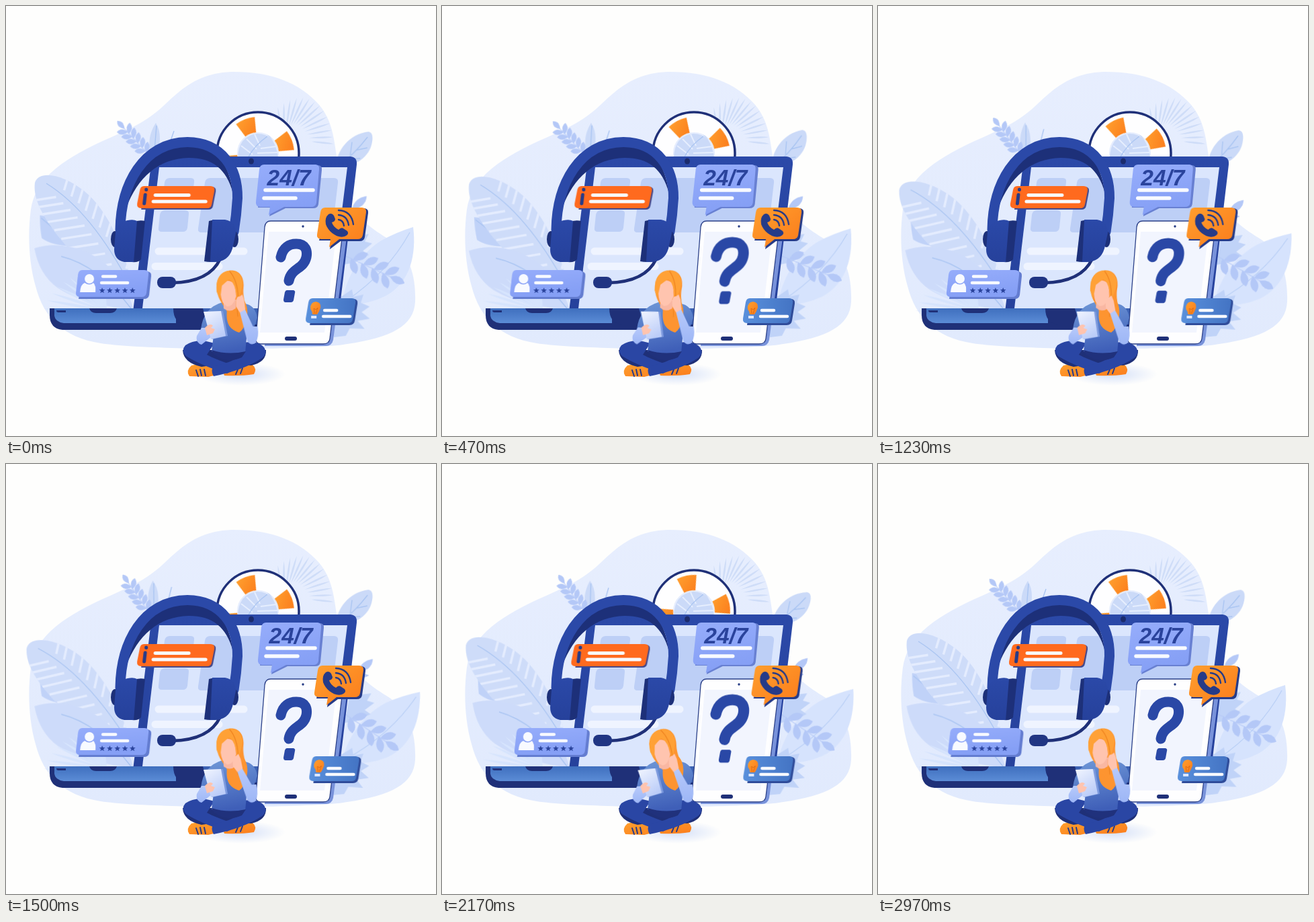
An HTML page that plays this animation: 640x640 px, repeating every 3010 ms.

```html
<!DOCTYPE html>
<html lang="en">
<head>
<meta charset="utf-8">
<title>Customer support</title>
<style>
html, body { margin: 0; width: 100%; height: 100%; overflow: hidden; background: #fefefd; }
svg { display: block; width: 100vw; height: 100vh; }
.even, .skew {
  transform-origin: var(--o, 0 0);
  animation: even 3010ms cubic-bezier(.37, 0, .63, 1) var(--d, 0ms) infinite;
}
.skew { animation-name: skew; animation-delay: var(--d, -2160ms); }
.pulse { transform-origin: 428px 394px; animation: pulse 1505ms cubic-bezier(.37, 0, .63, 1) infinite; }
@keyframes even { 0%, 100% { transform: var(--a); } 50% { transform: var(--b); } }
@keyframes skew { 0%, 100% { transform: var(--a); } 43% { transform: var(--b); } }
@keyframes pulse { 50% { transform: scale(1.08); } }
.bars { stroke: #f8faff; stroke-width: 5.5; stroke-linecap: round; fill: none; }
.vein { stroke: #aac5f2; stroke-width: 1.4; fill: none; }
.sprig { fill: #b4c8f7; stroke: #b4c8f7; }
.line { fill: none; stroke-linecap: round; stroke-linejoin: round; }
</style>
</head>
<body>
<svg viewBox="0 0 640 640">
<defs>
  <linearGradient id="blob" x2="0" y2="1"><stop stop-color="#e7eefe"/><stop offset="1" stop-color="#e1eafd"/></linearGradient>
  <linearGradient id="orange" x2="1" y2="1"><stop stop-color="#ff9f2e"/><stop offset="1" stop-color="#fb7c1c"/></linearGradient>
  <linearGradient id="sky" x2=".3" y2="1"><stop stop-color="#96adfb"/><stop offset="1" stop-color="#859ff5"/></linearGradient>
  <linearGradient id="slate" x2="1"><stop stop-color="#5990dc"/><stop offset="1" stop-color="#4474c4"/></linearGradient>
  <linearGradient id="base" x2="0" y2="1"><stop stop-color="#3f6fbe"/><stop offset="1" stop-color="#5b8cd6"/></linearGradient>
  <linearGradient id="navy" x2="0" y2="1"><stop stop-color="#2b49a8"/><stop offset="1" stop-color="#26419b"/></linearGradient>
  <linearGradient id="shirt" x2=".2" y2="1"><stop stop-color="#7099d8"/><stop offset="1" stop-color="#3f5fb8"/></linearGradient>
  <linearGradient id="sleeve" x2="0" y2="1"><stop stop-color="#b7cafb"/><stop offset="1" stop-color="#9db6f6"/></linearGradient>
  <linearGradient id="pad" x2=".5" y2="1"><stop stop-color="#f1f5ff"/><stop offset="1" stop-color="#bccdf8"/></linearGradient>
  <radialGradient id="shade"><stop stop-color="#d5e0f8"/><stop offset="1" stop-color="#fefefd"/></radialGradient>
  <clipPath id="bigShape"><path d="M43 263C49 243 86 251 116 275C153 305 179 365 190 430C145 413 105 377 77 342C54 312 40 287 43 263Z"/></clipPath>
  <clipPath id="aboveLid"><path d="M300 140H450V226H300Z"/></clipPath>
</defs>

<path fill="url(#blob)" d="M335 98C392 97 436 113 466 147C492 178 488 214 498 258C510 308 536 326 571 348C604 371 610 407 609 440C607 478 571 494 502 504C434 513 205 512 141 502C84 493 56 463 44 417C34 382 32 340 37 303C44 255 86 230 129 208C171 188 205 177 235 148C265 119 290 100 335 98Z"/>

<!-- foliage -->
<g id="topPalm" fill="#cfddf8"></g>
<g class="even" style="--o:215px 225px;--a:rotate(0deg);--b:rotate(-5deg)">
  <path fill="#cbdaf8" d="M223 174C233 191 229 209 222 230C209 212 212 191 223 174Z"/>
  <path class="vein" d="M224 178L220 228M250 186L240 215"/>
</g>
<g class="even" style="--o:215px 225px;--a:rotate(-1deg);--b:rotate(9deg);--d:-2710ms"><g id="leftSprig" class="sprig"></g></g>
<g class="skew" style="--o:110px 370px;--a:rotate(-3deg);--b:rotate(4deg)">
  <path fill="#c0d2f8" d="M50 312C66 313 75 321 84 321C95 330 101 342 101 357C82 358 64 354 53 346Q50 330 50 312Z"/>
  <path class="vein" d="M52 316Q75 335 99 355"/>
</g>
<g class="even" style="--o:190px 430px;--a:rotate(0deg);--b:rotate(-4.4deg)">
  <g clip-path="url(#bigShape)">
    <path fill="#cedcf9" d="M30 230H200V440H30Z"/>
    <g id="cuts" stroke="#e4ecfe" stroke-width="3.5"></g>
  </g>
  <path class="vein" d="M60 264Q128 306 186 418"/>
</g>
<g class="skew" style="--o:185px 450px;--a:rotate(-1.8deg);--b:rotate(2.2deg)">
  <path fill="#cddbfa" d="M42 361C74 350 115 358 146 382Q178 410 190 452C150 448 108 440 77 420Q49 400 42 361Z"/>
  <path class="vein" d="M82 373Q137 386 186 450"/>
</g>
<g class="even" style="--o:150px 455px;--a:rotate(0deg);--b:rotate(-2deg)"><g id="lowPalm" fill="#d6e4fd"></g></g>
<g class="skew" style="--o:495px 240px;--a:rotate(-3deg);--b:rotate(6deg)">
  <path fill="#cbdaf8" d="M490 243C491 214 510 190 538 186Q546 187 544 201C541 225 519 238 490 243Z"/>
  <path class="vein" d="M493 240Q518 220 537 194M512 221L514 202M520 214L537 210M507 228L527 226"/>
</g>
<g class="even" style="--a:translate(0,0);--b:translate(10px,8px);--d:-2810ms">
  <path class="sprig" d="M536 283Q535 299 515 302Q518 286 536 283ZM530 307Q515 315 503 309Q512 299 530 307Z"/>
</g>
<g class="even" style="--o:505px 440px;--a:rotate(0deg);--b:rotate(5.5deg)">
  <path fill="#d6e3fd" d="M606 329C611 369 602 411 566 431Q535 447 500 443C505 407 524 372 557 350Q580 337 606 329Z"/>
  <path class="vein" stroke-opacity=".6" d="M601 337Q568 397 506 439"/>
</g>
<g class="even" style="--o:495px 430px;--a:rotate(-1deg);--b:rotate(2deg);--d:-2710ms" fill="#c0d3f8">
  <path d="M503 385L509 341L522 333L527 342L541 340L535 351L546 354L532 365L541 371L520 382Z"/>
  <path d="M488 440L515 422L517 433L532 430L528 442L541 448L529 456L541 466L523 469L533 481L511 480L505 491L487 493Z"/>
</g>
<g class="skew" style="--o:505px 365px;--a:rotate(-2.7deg);--b:rotate(10.5deg);--d:-2510ms"><g id="rightSprig" class="sprig"></g></g>

<!-- lifebuoy -->
<g clip-path="url(#aboveLid)">
  <circle cx="375" cy="219" r="46" fill="none" stroke="#fefeff" stroke-width="30"/>
  <path fill="#cbdaf8" d="M345 226Q346 193 374 190Q401 190 405 226Z"/>
  <path stroke="#e6eefe" stroke-width="2" d="M350 208L367 221M358 198L373 213M370 191L378 208M402 209L379 212M404 218L374 219"/>
  <path class="vein" d="M360 226Q370 207 389 194"/>
  <g class="skew" style="--o:375px 219px;--a:rotate(-30deg);--b:rotate(-12deg)"><g id="buoy" fill="url(#orange)"></g></g>
  <circle cx="375" cy="219" r="61" fill="none" stroke="#1f3078" stroke-width="3.5"/>
</g>

<!-- laptop -->
<path fill="url(#navy)" d="M225 224H513Q523 225 522 236L496 455H189L216 235Q217 225 225 224Z"/>
<path fill="#dbe6fd" d="M228 240H508L482 450H203Z"/>
<ellipse cx="365" cy="231" rx="4" ry="4.5" fill="#1b2b6c"/>
<g fill="#bdcff6">
  <path d="M244 256H275Q281 256 280 262L277 289Q276 295 270 295H238Q232 295 233 289L236 263Q237 256 244 256Z"/>
  <path d="M237 304H266Q273 304 272 310L270 330Q269 336 263 336H232Q226 336 227 330L229 311Q230 304 237 304Z"/>
  <path d="M304 256H488Q495 256 494 263L486 331Q485 337 479 337H291Q285 337 286 331L296 263Q297 256 304 256Z"/>
</g>
<path d="M227 365H354M222 387.500H317" class="bars" style="stroke-width:11;stroke:#eff4ff"/>
<path fill="#1f3078" d="M65 450H402V482H84Q65 480 65 460Z"/>
<path fill="url(#base)" d="M72 450H253V472H86Q73 470 72 461Z"/>
<path fill="#3c62b4" d="M278 450H402V474H290Z"/>
<path fill="#1f3078" d="M249 450H293L300 474H268Q249 472 249 450ZM124 450H165Q163 457 155 457H134Q126 457 124 450ZM75 453H89V456H78Q75 456 75 453Z"/>

<!-- headset -->
<path class="line" stroke="#1f3078" stroke-width="4.500" d="M319 376Q303 411 247 412"/>
<rect x="225" y="403" width="28" height="17" rx="8" fill="#203583"/>
<path fill="#1d3079" d="M179 300C188 244 222 209 270 209C315 209 332 235 338 279C328 242 307 226 272 226C226 227 196 256 179 300Z"/>
<path class="line" stroke="#2b49a8" stroke-width="15" d="M170 333C171 266 204 203 270 202.500C322 203 345 242 344.500 286Q343 312 339 336"/>
<g fill="#1d3079">
  <ellipse cx="162" cy="347" rx="6" ry="12"/><ellipse cx="340" cy="347" rx="6" ry="12"/>
  <path d="M187 322Q198 318 207 320L201 377Q198 382 187 381Z"/>
  <path d="M302 320Q311 317 316 320V380Q304 382 295 380Z"/>
</g>
<path fill="url(#navy)" d="M181 319Q190 317 195 320L190 381H176Q161 378 161 362L163 337Q165 322 181 319ZM307 318H326Q343 321 342 338L337 361Q331 381 310 381H304Z"/>

<!-- tablet -->
<path fill="#7892da" d="M395 320H503Q510 321 509 329L487 497Q485 506 476 506H385Z"/>
<path fill="#fefeff" stroke="#2b4088" stroke-width="1.300" d="M394 320H496Q503 321 502 329L482 495Q481 503 472 503H379Q371 503 372 494L385 329Q386 320 394 320Z"/>
<path fill="#f2f5fe" d="M391 336H492L474 486H378Z"/>
<circle cx="442" cy="328" r="1.700" fill="#243a84"/>
<rect x="415" y="492" width="18" height="6" rx="3" fill="#1f3078"/>
<g class="pulse">
  <path class="line" stroke="#2a48a6" stroke-width="15" d="M409 374C412 359 422 354 432 354C446 354 449 364 447 374C443 392 424 390 421 409"/>
  <path fill="#2a48a6" d="M418 423H428Q431 424 430 427L428 438Q427 441 424 441H416Q413 441 413 437L415 426Q416 423 418 423Z"/>
</g>

<!-- floating cards -->
<g class="even" style="--a:translate(0,0);--b:translate(3px,0)">
  <path fill="#6880d2" d="M384 237H465Q471 238 470 244L465 295Q464 301 457 301H416L392 313L395 300H375Z"/>
  <path fill="url(#sky)" d="M384 236H461Q467 237 466 243L462 293Q461 299 454 299H414L391 311L393 299H378Q371 298 372 291L377 243Q378 236 384 236Z"/>
  <text x="388.500" y="266.500" font-family="'Liberation Sans', Arial, sans-serif" font-size="33.500" font-weight="700" font-style="italic" fill="#2a439c">24/7</text>
  <path class="bars" d="M386 274H457M384 286H431"/>
</g>
<g class="even" style="--a:translate(0,0);--b:translate(-4px,0)">
  <path fill="#263b88" d="M478 301H533Q540 302 539 308L534 344Q533 350 526 350H498L482 362L484 349H466Z"/>
  <path fill="url(#orange)" d="M475 300H530Q537 301 536 307L531 341Q530 347 523 347H496L481 359L483 347H469Q462 346 463 340L468 307Q469 300 475 300Z"/>
  <path fill="#263b88" d="M480 310Q485 307 488 312L490 317Q490 321 485 322Q487 329 495 333Q499 329 502 331L508 335Q511 339 506 342C496 348 480 337 476 325Q474 315 480 310Z"/>
  <path class="line" stroke="#263b88" stroke-width="2.300" d="M495 318Q502 319 503 327M495 311Q508 312 510 326M495 304Q514 305 517 325"/>
</g>
<g class="skew" style="--a:translate(-3.5px,0);--b:translate(3.800px,0)">
  <path fill="#637cd0" d="M113 395H210Q217 396 216 402L213 430Q212 436 205 436H108Z"/>
  <path fill="url(#sky)" d="M113 393H206Q213 393 212 400L209 427Q208 433 202 433H110Q103 433 104 426L107 400Q108 393 113 393Z"/>
  <path fill="#f8faff" d="M124 399A7 7 0 0 1 124 413A7 7 0 0 1 124 399M117 412Q124 417 130 412Q134 416 133 426H110Q111 414 117 412Z"/>
  <path class="bars" style="stroke-width:4.500" d="M144 402.500H163M142 412H181"/>
  <g id="stars" fill="#2a439c"></g>
</g>
<g class="skew" style="--a:translate(3px,0);--b:translate(-2.600px,0)">
  <path fill="#44498c" d="M205 269H307Q313 270 312 276L308 297Q307 303 301 303H201Z"/>
  <path fill="#ff6a1e" d="M205 268H304Q311 268 310 275L306 295Q305 301 299 301H201Q194 301 195 294L199 274Q200 268 205 268Z"/>
  <path class="line" stroke="#263b88" stroke-width="5" d="M207 281L205.500 294M208.500 273.500V273"/>
  <path class="bars" style="stroke-width:5" d="M222 281.500H272M219 291H297"/>
</g>
<g class="even" style="--a:translate(0,0);--b:translate(5.500px,0);--d:-150ms">
  <path fill="#2f4c9a" d="M457 436H518Q524 437 523 443L519 468Q518 475 511 475H452Z"/>
  <path fill="url(#slate)" d="M456 435H515Q521 435 520 442L516 466Q515 472 509 472H452Q445 472 446 465L450 441Q451 435 456 435Z"/>
  <path fill="url(#orange)" d="M461 440Q469 441 468 449Q466 455 463 459H456Q456 455 453 451Q452 441 461 440Z"/>
  <path stroke="#df6c12" fill="none" d="M459 458L458 450L461 452L464 449L461 458"/>
  <path stroke="#dbe7ff" stroke-width="4" d="M454 463H462"/>
  <path class="bars" style="stroke-width:4.500" d="M474 453H492M472 462H512"/>
</g>

<!-- woman -->
<ellipse cx="350" cy="548" rx="66" ry="17" fill="url(#shade)"/>
<path fill="url(#orange)" d="M276 535Q290 531 310 535L313 549L301 552L273 551Q267 543 276 535ZM323 545L350 533L367 534Q374 540 369 548Q350 551 325 550Z"/>
<path class="line" stroke="#263b88" stroke-width="2" d="M283 542L286 551M289 541L291 550M295 541L297 550M345 541L342 548M352 539L349 547"/>
<path fill="#1f3078" d="M263 512Q264 531 291 537L326 532L365 535Q388 530 387 512Z"/>
<path fill="#2a46a4" d="M310 502Q284 493 267 505Q260 513 268 521Q290 535 329 547L347 538Q309 525 299 519Z"/>
<path fill="#2a46a4" d="M350 502Q373 496 384 508Q390 517 381 524Q354 542 309 551Q304 543 309 535Q335 532 352 519Z"/>
<path fill="url(#shirt)" d="M322 441Q344 437 355 443Q371 445 374 464L369 479L359 483L356 516Q330 522 306 514L309 490L290 481Q294 449 322 441Z"/>
<path fill="#20317c" d="M306 512Q330 520 357 514L351 523Q330 533 310 519Z"/>
<path fill="#fd9430" d="M336 428C358 430 362 452 358 466Q354 482 347 486C331 481 327 470 329 452Z"/>
<g class="skew" style="--o:339px 456px;--a:rotate(6deg);--b:rotate(-8deg)">
  <path fill="#fd9430" d="M332 394C349 391 356 405 354 420C352 437 360 447 357 463L340 468L328 453L319 438C309 418 314 397 332 394Z"/>
  <path fill="#f9b7a2" d="M324 437H343L342 450Q333 457 324 450Z"/>
  <path fill="#ffc4af" d="M320 414Q331 404 341 414L343 432Q338 448 329 447Q321 443 320 429Z"/>
  <path fill="#ffa136" d="M331 394Q312 398 314 425L319 436L322 416Q331 408 333 407Q339 410 342 422L346 440Q351 424 353 413Q351 392 331 394Z"/>
  <path class="line" stroke="#ef8420" stroke-width="1.200" d="M334 395Q345 408 346 433Q343 449 345 462"/>
</g>
<g class="even" style="--o:372px 500px;--a:rotate(2deg);--b:rotate(-4deg);--d:-2710ms">
  <path fill="url(#sleeve)" d="M346 453L354 451L367 477L374 477Q377 493 371 502Q364 506 359 499Z"/>
  <path fill="#ffc4af" d="M341 439Q342 432 346 433L350 430L353 438L355 452L347 457L341 448Z"/>
</g>
<g class="skew" style="--o:303px 492px;--a:rotate(4deg);--b:rotate(-4deg)">
  <path fill="url(#sleeve)" d="M291 479L284 491Q282 501 291 504L311 488L304 479Z"/>
  <path fill="#7d9ade" d="M297 455L323 454L330 491L307 496Z"/>
  <path fill="url(#pad)" d="M294 455L320 454L327 491L305 496Z"/>
  <path fill="#ffc4af" d="M296 479Q304 471 308 476L305 479L311 481L308 487L299 490Z"/>
</g>
</svg>
<script>
const fill = (id, parts) => { document.getElementById(id).innerHTML = parts.join(""); };
const each = (n, f) => Array.from({ length: n }, (_, i) => f(i));
const lens = (x, y, turn, len, w) =>
  `<path transform="translate(${x} ${y}) rotate(${turn})" d="M0 0Q${len * .6} ${-w} ${len} 0Q${len * .6} ${w} 0 0Z"/>`;

// Paired leaflets on a straight stem
function sprig(id, x, y, turn, len, pairs, leaf) {
  const rows = each(pairs, i => {
    const at = len * (.2 + .68 * i / (pairs - 1));
    return lens(at, 0, -48, leaf, leaf * .45) + lens(at - 3, 0, 48, leaf, leaf * .45);
  });
  fill(id, [`<g transform="translate(${x} ${y}) rotate(${turn})"><path d="M0 0H${len}"/>`,
    ...rows, lens(len, 0, 0, leaf, leaf * .45), "</g>"]);
}
sprig("leftSprig", 215, 224, 227, 57, 5, 15);
sprig("rightSprig", 503, 371, 25, 76, 4, 23);

fill("topPalm", each(17, i => lens(400 + i * 3.4, 207 - 30 * Math.sin(i / 5.4), -122 + i * 8, 34 + 12 * Math.sin(i / 5), 2.8)));
fill("lowPalm", each(11, i => lens(150, 454, 182 + i * 8, 94 - i * 4, 4)));

// Gaps between ribs, along the curved midrib
fill("cuts", each(10, i => {
  const t = .16 + i * .082, s = 1 - t;
  const x = 60 * s * s + 256 * s * t + 186 * t * t;
  const y = 264 * s * s + 612 * s * t + 418 * t * t;
  return `<path d="M${x - 7} ${y + 5}l-45 7M${x + 5} ${y - 5}l12 -40"/>`;
}));

const polar = (r, deg) => {
  const a = deg * Math.PI / 180;
  return `${(375 + r * Math.sin(a)).toFixed(2)} ${(219 - r * Math.cos(a)).toFixed(2)}`;
};
fill("buoy", each(4, i => {
  const a = i * 90 - 16, b = i * 90 + 16;
  return `<path d="M${polar(31, a)}L${polar(54, a)}A54 54 0 0 1 ${polar(54, b)}L${polar(31, b)}A31 31 0 0 0 ${polar(31, a)}Z"/>`;
}));

const star = each(10, i => {
  const r = i % 2 ? 2 : 4.6, a = i * Math.PI / 5;
  return `${(r * Math.sin(a)).toFixed(2)},${(-r * Math.cos(a)).toFixed(2)}`;
}).join(" ");
fill("stars", each(5, i => `<polygon points="${star}" transform="translate(${143 + i * 11.3} 423.500)"/>`));
</script>
</body>
</html>
```
